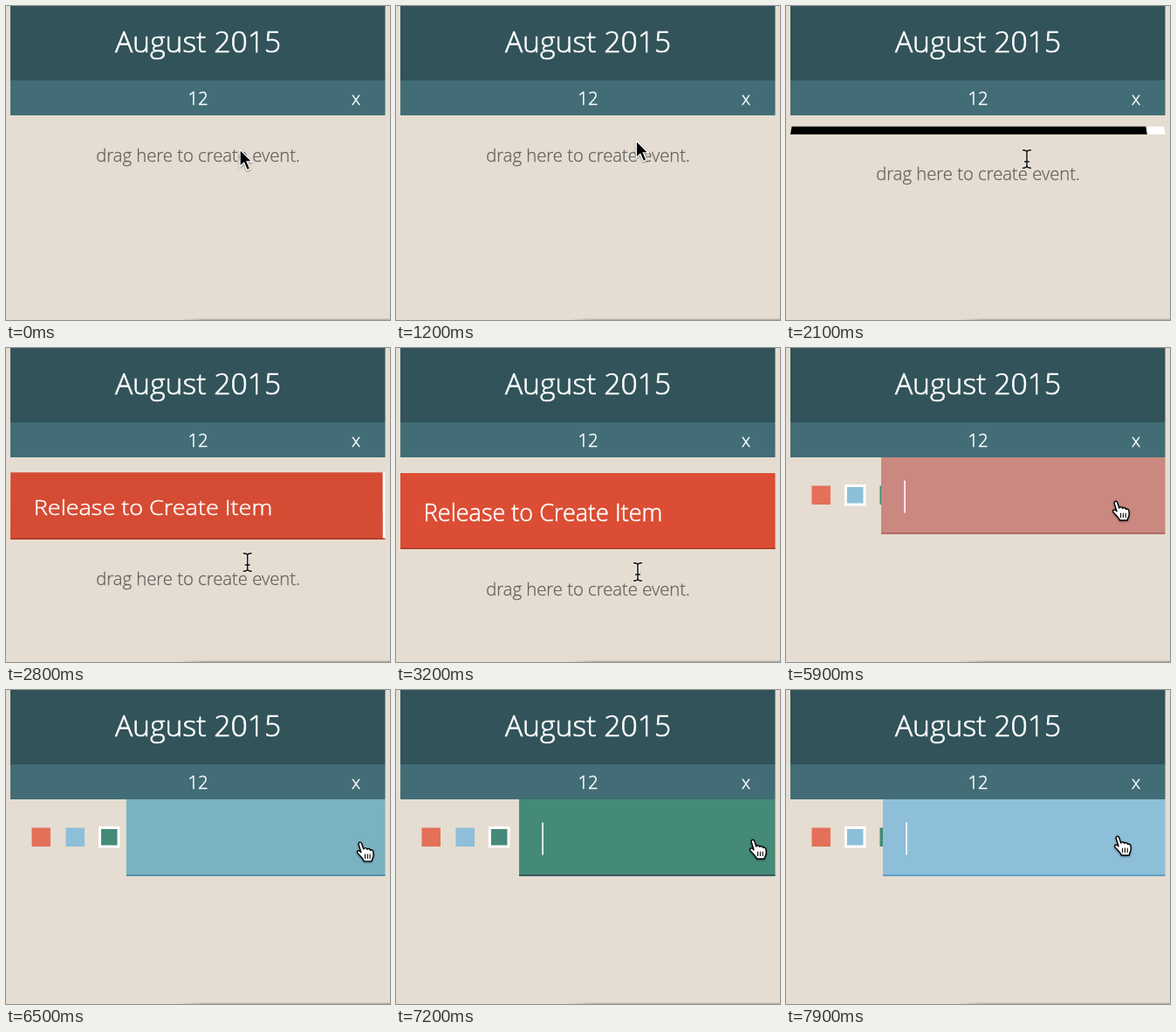
Animation of 440 by 359 pixels, one loop 8000 ms. Source, as an HTML page:

```html
<!DOCTYPE html>
<html lang="en">
<head>
<meta charset="utf-8">
<title>Calendar day</title>
<style>
  html, body { margin: 0; width: 100%; height: 100%; overflow: hidden; background: #e5ddd1; }
  svg { display: block; width: 440px; height: 359px; }
  text { font: 300 20.25px "Open Sans", sans-serif; fill: #fff; stroke: #fff; stroke-width: .5px; }
  .title { font-size: 33.7px; stroke-width: .65px; }
  .label { font-size: 27px; stroke-width: .6px; }
  .hint { fill: #64625f; stroke: #64625f; stroke-width: .3px; }
  .mid { text-anchor: middle; }
  .cursor { filter: drop-shadow(0 1px 1px rgba(0, 0, 0, .4)); }
</style>
</head>
<body>
<svg viewBox="0 0 440 359">
  <defs>
    <linearGradient id="shade">
      <stop offset="0" stop-color="#8c8680" stop-opacity="0"/>
      <stop offset=".12" stop-color="#8c8680" stop-opacity=".5"/>
      <stop offset="1" stop-color="#8c8680" stop-opacity=".5"/>
    </linearGradient>
  </defs>
  <rect width="440" height="359" fill="#e5ddd1"/>
  <rect x="196" y="357" width="244" height="1" fill="url(#shade)" opacity=".4"/>
  <rect x="198" y="358" width="242" height="1" fill="url(#shade)"/>

  <text id="hint" class="hint mid" x="220" y="177.5">drag here to create event.</text>

  <g id="flap">
    <polygon id="back" fill="#fff"/>
    <polygon id="front"/>
    <rect id="lip" x="5" width="429.5" height="1.5" fill="#a83a24"/>
    <g id="fold"><text class="label" x="31.8" y="55">Release to Create Item</text></g>
  </g>

  <g id="swatches"></g>

  <g id="item">
    <rect id="body" height="87"/>
    <rect id="edge" height="1.8"/>
    <rect id="caret" width="1.6" height="37" fill="#fff"/>
  </g>

  <rect x="5" width="429.5" height="85" fill="#315359"/>
  <rect x="5" y="85" width="429.5" height="40" fill="#426d76"/>
  <text class="title mid" x="220" y="53">August 2015</text>
  <text class="mid" x="220" y="113">12</text>
  <text class="mid" x="401" y="113">x</text>

  <g id="arrow" class="cursor">
    <path d="M0 0V19.5L4.6 15.3 8.2 23.6 11.6 22.1 8.1 14H14Z" fill="#000" stroke="#fff" stroke-width="1.3"/>
  </g>
  <g id="beam" fill="none" stroke-linecap="round">
    <path d="M-4.5-10.2Q0-10.2 0-7.5Q0-10.2 4.5-10.2M0-7.5V7.5M-4.5 10.2Q0 10.2 0 7.5Q0 10.2 4.5 10.2M-2.5 3H2.5" stroke="#fff" stroke-opacity=".6" stroke-width="3.2"/>
    <path d="M-4.5-10.2Q0-10.2 0-7.5Q0-10.2 4.5-10.2M0-7.5V7.5M-4.5 10.2Q0 10.2 0 7.5Q0 10.2 4.5 10.2M-2.5 3H2.5" stroke="#111" stroke-width="1.5"/>
  </g>
  <g id="hand" class="cursor" stroke="#000" stroke-linejoin="round" stroke-linecap="round">
    <path d="M-1.8 1.6C-2.5-1 1-1.6 1.8 1L3.8 7C4.8 5.2 7.4 5.4 7.8 7.4C8.8 6 11.2 6.4 11.6 8.4C13 7.4 14.8 8.4 15 10.4L15.2 14C15.2 17 13.4 18 13.2 21H4.4C3.4 17.6-.6 15-3 11.6C-4.4 9.2-1.8 8 0 9.8L1 10.8Z" fill="#fff" stroke-width="1.4"/>
    <path d="M5.6 13V17.5M8.4 13V17.5M11.2 13V17.5" fill="none" stroke-width="1.1"/>
  </g>
</svg>
<script>
const LOOP = 8000, STEP = 100;
const LEFT = 5, RIGHT = 434.5, TOP = 125, TALL = 87, PULL = 105;
const RELEASE = 3500;
const RED = [229, 112, 90], BLUE = [141, 191, 217], GREEN = [69, 138, 120];
const EDGES = [[208, 75, 54], [82, 155, 194], [47, 79, 88]];
const FILLS = [RED, BLUE, GREEN];
const HOT = [219, 77, 52];
// time and index of each colour choice
const PICKS = [[5780, 1], [6400, 2], [7350, 1]];
const FADE = 400;

const $ = id => document.getElementById(id);
const set = (el, attrs) => { for (const k in attrs) el.setAttribute(k, attrs[k]); };
const show = (id, on) => { $(id).style.display = on ? "" : "none"; };
const clamp = v => Math.max(0, Math.min(1, v));
const mix = (a, b, p) => a + (b - a) * p;
const blend = (a, b, p) => a.map((v, i) => mix(v, b[i], p));
const rgb = c => `rgb(${c.map(Math.round)})`;
const easeOut = p => 1 - (1 - p) ** 3;

// Smooth curve through [time, value] keys, flat at turning points
function track(keys) {
  const rate = i => (keys[i + 1][1] - keys[i][1]) / (keys[i + 1][0] - keys[i][0]);
  const slope = keys.map((_, i) => {
    if (!i || i === keys.length - 1) return 0;
    const a = rate(i - 1), b = rate(i);
    return a * b > 0 ? 2 * a * b / (a + b) : 0;
  });
  return t => {
    if (t <= keys[0][0]) return keys[0][1];
    const n = keys.findIndex(k => k[0] > t);
    if (n < 0) return keys[keys.length - 1][1];
    const [t0, a] = keys[n - 1], [t1, b] = keys[n], d = t1 - t0, u = (t - t0) / d;
    return a + (b - a) * u * u * (3 - 2 * u)
      + d * u * (1 - u) * (slope[n - 1] * (1 - u) - slope[n] * u);
  };
}

const pull = track([[1700, 0], [2100, 21.7], [2900, 99], [3200, PULL]]);
const slide = track([[4600, 0], [5300, 50], [5900, 104], [6400, 130], [6800, 138], [7200, 136], [7500, 116], [7900, 106]]);
const mouseX = track([[300, 268], [1400, 276], [2100, 276], [3200, 277], [3600, 277], [4200, 280], [4600, 280], [5300, 326],
  [5900, 378], [6400, 403], [6800, 411], [7200, 409], [7500, 390], [7900, 380]]);
const mouseY = track([[300, 164], [1400, 153], [1700, 153], [2100, 175], [2900, 250], [3200, 256], [3600, 256],
  [4200, 176], [5900, 176], [7200, 172], [7900, 168]]);

const swatches = FILLS.map((c, i) => {
  const r = document.createElementNS("http://www.w3.org/2000/svg", "rect");
  set(r, { x: 29.5 + 39 * i, y: 157.5, width: 21.5, height: 21.5, fill: rgb(c) });
  return $("swatches").appendChild(r);
});

function drawFlap(off) {
  const p = clamp(off / PULL), low = TOP + off;
  const high = TOP + Math.min(off, mix(11.3, 18, p));
  const inset = 2 * (1 - p), cut = 26 * (1 - p);
  const quad = (a, b, lean) => `${a + inset},${high} ${b - lean},${high} ${b},${low} ${a},${low}`;
  const open = clamp((p - .21) / .7);
  set($("back"), { points: quad(RIGHT - cut - inset, RIGHT, inset) });
  set($("front"), { points: quad(LEFT, RIGHT - cut, inset), fill: rgb(blend([0, 0, 0], HOT, open)) });
  set($("lip"), { y: low - 1.5, opacity: open });
  set($("fold"), { transform: `translate(0 ${high}) scale(1 ${(low - high) / TALL})`, opacity: open });
}

function drawItem(t) {
  const x = LEFT + slide(t), w = RIGHT - x;
  const drop = easeOut(clamp((t - RELEASE) / 300));
  const y = mix(TOP + 18, TOP, drop);
  let fill = blend(HOT, RED, drop), edge = EDGES[0], pick = 0;
  for (const [at, i] of PICKS) {
    if (t < at) break;
    const p = clamp((t - at) / FADE);
    fill = blend(fill, FILLS[i], p);
    edge = blend(edge, EDGES[i], p);
    pick = i;
  }
  set($("body"), { x, y, width: w, fill: rgb(fill) });
  set($("edge"), { x, y: y + TALL - 1, width: w, fill: rgb(edge) });
  set($("caret"), { x: x + 26.3, y: y + 26.5 });
  show("caret", t > 3700 && (t + 250) % 1000 < 500);
  swatches.forEach((s, i) => set(s, { stroke: i === pick ? "#fff" : "none", "stroke-width": 3 }));
}

function draw(t) {
  const made = t >= RELEASE, off = pull(t);
  show("hint", !made);
  show("flap", !made && off > 0);
  show("item", made);
  show("swatches", t >= 4600);
  if (made) drawItem(t);
  else {
    set($("hint"), { y: 177.5 + off });
    drawFlap(off);
  }
  const kind = t < 1400 ? "arrow" : t < 3800 ? "beam" : "hand";
  for (const id of ["arrow", "beam", "hand"]) show(id, id === kind);
  set($(kind), { transform: `translate(${mouseX(t)} ${mouseY(t)})` });
}

function tick() {
  draw(Math.floor(performance.now() % LOOP / STEP) * STEP);
  requestAnimationFrame(tick);
}
tick();
</script>
</body>
</html>
```
